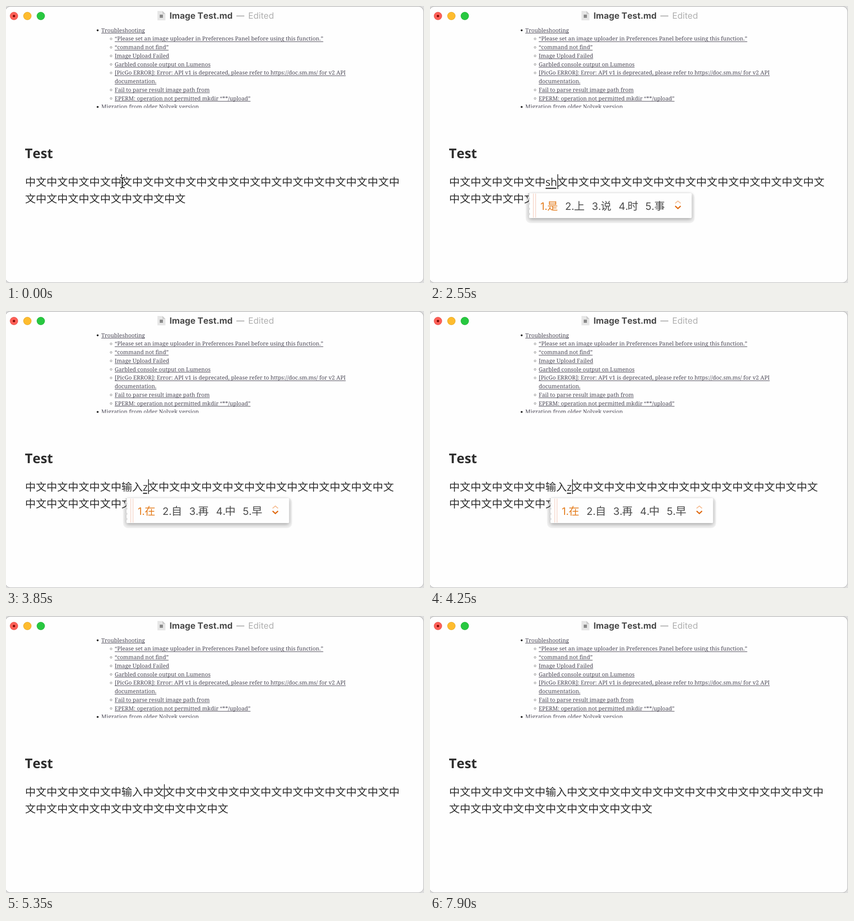
Animation, 919 px wide and 610 px high, one loop 8 s. Source, as an HTML page with a canvas:

```html
<!DOCTYPE html>
<html lang="zh-Hans">
<head>
<meta charset="utf-8">
<title>Image Test.md</title>
<style>
html, body { margin: 0; width: 919px; height: 610px; overflow: hidden; background: #dedede; }
canvas { display: block; }
</style>
</head>
<body>
<canvas id="stage" width="919" height="610"></canvas>
<script>
const ctx = document.getElementById('stage').getContext('2d');
ctx.textRendering = 'geometricPrecision';
ctx.fontKerning = 'none';

const LOOP = 8000, EM = 23.52, LEFT = 42, RIGHT = 875, GAP = 15.8;
const CJK = '"Noto Sans CJK SC", "Noto Sans CJK", sans-serif';
const BODY = `${EM}px "Open Sans", ${CJK}`;
const HEAD = '中文'.repeat(4) + '中', TAIL = '文' + '中文'.repeat(20);

// [start ms, committed text, text being composed, candidates]
const STEPS = [
  [0, '', ''],
  [2000, '', 's', '是 上 说 时 三'],
  [2350, '', 'sh', '是 上 说 时 事'],
  [2850, '', 'shu', '术 书 📚 数 输'],
  [3250, '', "shu'r", '输入 熟人 属热 数日 树人'],
  [3450, '', "shu'ru", '输入 熟入 数入 书如 属辱'],
  [3600, '输入', ''],
  [3850, '输入', 'z', '在 自 再 中 早'],
  [4350, '输入', 'zh', '这 中 只 着 真'],
  [4500, '输入', 'zho', '中 种 重 周 州'],
  [4600, '输入', 'zhon', '中 种 重 钟 众'],
  [4700, '输入', 'zhong', '中 种 重 钟 众'],
  [4750, '输入', "zhong'w", '中文 中午 中外 中卫 中网'],
  [4950, '输入', "zhong'we", '中文 中微 重温 中位 中卫'],
  [5100, '输入', "zhong'wen", '中文 重温 中稳 中温 钟文'],
  [5300, '输入中文', '']
];

const LIST = [
  [0, 'Troubleshooting'],
  [1, '“Please set an image uploader in Preferences Panel before using this function.”'],
  [1, '“command not find”'],
  [1, 'Image Upload Failed'],
  [1, 'Garbled console output on Lumenos'],
  [1, '[PicGo ERROR]: Error: API v1 is deprecated, please refer to https://doc.sm.ms/ for v2 API'],
  [2, 'documentation.'],
  [1, 'Fail to parse result image path from'],
  [1, 'EPERM: operation not permitted mkdir “**/upload”'],
  [0, 'Migration from older Nolvek version']
];

function text(s, x, y, font, color) {
  ctx.font = font;
  ctx.fillStyle = color;
  ctx.fillText(s, x, y);
}

function rect(x, y, w, h, color) {
  ctx.fillStyle = color;
  ctx.fillRect(x, y, w, h);
}

function round(x, y, w, h, r, color) {
  ctx.beginPath();
  ctx.roundRect(x, y, w, h, r);
  ctx.fillStyle = color;
  ctx.fill();
}

function disc(x, y, r, color) {
  ctx.beginPath();
  ctx.arc(x, y, r, 0, 7);
  ctx.fillStyle = color;
  ctx.fill();
}

function poly(points, color) {
  ctx.beginPath();
  points.forEach(p => ctx.lineTo(...p));
  ctx.fillStyle = color;
  ctx.fill();
}

function line(points, color, width) {
  ctx.beginPath();
  points.forEach(p => ctx.lineTo(...p));
  ctx.strokeStyle = color;
  ctx.lineWidth = width;
  ctx.stroke();
}

function light(x, color) {
  disc(x, 22, 9, color);
  ctx.strokeStyle = 'rgba(0,0,0,.1)';
  ctx.lineWidth = 1;
  ctx.beginPath();
  ctx.arc(x, 22, 8.5, 0, 7);
  ctx.stroke();
}

function drawWindow() {
  rect(0, 0, 919, 610, '#dedede');
  round(-2, 0, 920.5, 609.7, 12, '#b9b9b9');
  round(-1, 1.5, 918.5, 607.2, 11, '#fefefe');
  light(17.5, '#fe5f57');
  disc(17.5, 22, 2.6, '#7d0a05');
  light(47, '#febc2e');
  light(76.5, '#28c840');

  poly([[333, 11], [344, 11], [350.5, 17.5], [350.5, 31.5], [333, 31.5]], '#e6e6e6');
  poly([[344, 11], [350.5, 17.5], [344, 17.5]], '#c9c9c9');
  rect(338, 19, 7, 7, '#8a8a8a');

  text('Image Test.md', 359.5, 28, 'bold 19px Inter, sans-serif', '#4a4a4a');
  rect(506.5, 21, 17.5, 2, '#b0b0b0');
  text('Edited', 532.5, 28, '19px Inter, sans-serif', '#b0b0b0');
}

function drawList() {
  const ink = '#4b4856';
  ctx.save();
  ctx.beginPath();
  ctx.rect(190, 44, 600, 180.5);
  ctx.clip();
  LIST.forEach(([level, s], i) => {
    const y = 53.1 + i * 18.75, x = level ? 239 : 209.5;
    text(s, x, y + 4.4, '12.22px "Noto Serif", serif', ink);
    rect(x, y + 6.2, ctx.measureText(s).width, 1.1, ink);
    if (level === 0) disc(201.5, y + .5, 2.1, '#222');
    if (level === 1) {
      ctx.beginPath();
      ctx.arc(231, y + .5, 2, 0, 7);
      ctx.strokeStyle = '#777';
      ctx.lineWidth = .9;
      ctx.stroke();
    }
  });
  ctx.restore();
}

// Lays out the paragraph and returns the x range of the composed text.
function drawParagraph(done, typing) {
  const all = HEAD + done + typing + TAIL;
  const from = HEAD.length + done.length, to = from + typing.length;
  let x = LEFT, y = 395.5, start, end;
  ctx.font = BODY;
  [...all].forEach((c, i) => {
    const w = c < '\u0100' ? ctx.measureText(c).width : EM;
    if (i === from) start = x;
    if (i === to) end = x;
    if (x + w > RIGHT) { x = LEFT; y += 37.2; }
    text(c, x, y, BODY, '#2e2e2e');
    x += w;
  });
  if (typing) rect(start + .5, 400.3, end - start - 2, 2.4, '#2e2e2e');
  return [start, end];
}

function drawBooks(x, y) {
  [['#4a90c4', 16], ['#3d9a5c', 9], ['#c8372f', 2]].forEach(([color, dy], i) => {
    const l = x + [4, 1, 0][i], t = y + dy;
    poly([[l, t], [l + 14, t - 3], [l + 23, t + 2], [l + 9, t + 6]], color);
    poly([[l, t], [l + 9, t + 6], [l + 9, t + 9], [l, t + 3]], color);
    poly([[l + 9, t + 6], [l + 23, t + 2], [l + 22, t + 5], [l + 9, t + 8.5]], '#ece7dc');
    line([[l + 9, t + 9], [l + 23, t + 5]], color, 1.4);
  });
}

function drawPopup(x, words) {
  const items = words.split(' ');
  const isBooks = w => w === '📚';
  const size = w => isBooks(w) ? 30 : w.length * EM;
  const label = i => i ? 19.5 : 15;
  const first = x - 11, left = x - 36;
  const chevron = items.reduce((s, w, i) => s + label(i) + size(w) + GAP, first) + 12.8;
  const right = chevron + 30.3;

  round(left - 7, 411, right - left + 13, 67, 10, 'rgba(0,0,0,.05)');
  ctx.save();
  ctx.shadowColor = 'rgba(0,0,0,.32)';
  ctx.shadowBlur = 8;
  ctx.shadowOffsetY = 3;
  round(left, 412, right - left, 55, 2, '#fefefe');
  ctx.restore();
  for (let y = 424; y < 462; y += 11.3) disc(left - .5, y, 2.7, '#dadada');
  rect(left + 9, 413, 1.3, 53, '#f5cfc1');
  rect(left + 14, 413, 1.3, 53, '#f5cfc1');

  let at = first;
  items.forEach((w, i) => {
    const color = i ? '#4c4c4c' : '#e47c1c';
    text(i + 1 + '.', at, 449, '22.5px Inter, sans-serif', color);
    at += label(i);
    if (isBooks(w)) drawBooks(at + 2.5, 429);
    else [...w].forEach((c, k) => text(c, at + k * EM, 449, `${EM}px ${CJK}`, color));
    at += size(w) + GAP;
  });
  line([[chevron - 6, 434.5], [chevron, 429.5], [chevron + 6, 434.5]], '#f6bd92', 2);
  line([[chevron - 6, 440.5], [chevron, 446], [chevron + 6, 440.5]], '#e06a10', 2.4);
}

function drawBeam(x, y) {
  const path = () => {
    ctx.beginPath();
    ctx.moveTo(x - 5, y - 11.5);
    ctx.quadraticCurveTo(x, y - 11.5, x, y - 8);
    ctx.quadraticCurveTo(x, y - 11.5, x + 5, y - 11.5);
    ctx.moveTo(x, y - 8);
    ctx.lineTo(x, y + 8);
    ctx.moveTo(x - 5, y + 11.5);
    ctx.quadraticCurveTo(x, y + 11.5, x, y + 8);
    ctx.quadraticCurveTo(x, y + 11.5, x + 5, y + 11.5);
    ctx.moveTo(x - 2.5, y);
    ctx.lineTo(x + 2.5, y);
  };
  for (const [color, width] of [['#fff', 4], ['#000', 1.7]]) {
    path();
    ctx.strokeStyle = color;
    ctx.lineWidth = width;
    ctx.stroke();
  }
}

function drawPointer(t) {
  if (t < 2000) drawBeam(256, 389);
  if (t < 5850 || t > 6400) return;
  const u = (t - 5850) / 300;
  const curve = (a, b, c) => (1 - u) ** 2 * a + 2 * u * (1 - u) * b + u * u * c;
  drawBeam(curve(256, 405.5, 393), curve(389, 446, 539));
}

function caretOn(t) {
  if (t < 2000) return t < 900 || t >= 1400;
  return t < 5400 || Math.floor((t - 5400) / 500) % 2 === 0;
}

function draw(t) {
  const [, done, typing, words] = STEPS.findLast(s => t >= s[0]);
  drawWindow();
  drawList();
  text('Test', 41.5, 335.3, 'bold 29.4px "Open Sans", sans-serif', '#2e2e2e');
  const [start, end] = drawParagraph(done, typing);
  if (caretOn(t)) rect(end + (typing ? .8 : -.3), 370.5, 1.6, 32.5, '#222');
  if (words) drawPopup(start, words);
  drawPointer(t);
}

const begin = performance.now();
function tick() {
  draw((performance.now() - begin) % LOOP);
  requestAnimationFrame(tick);
}
tick();
</script>
</body>
</html>
```
